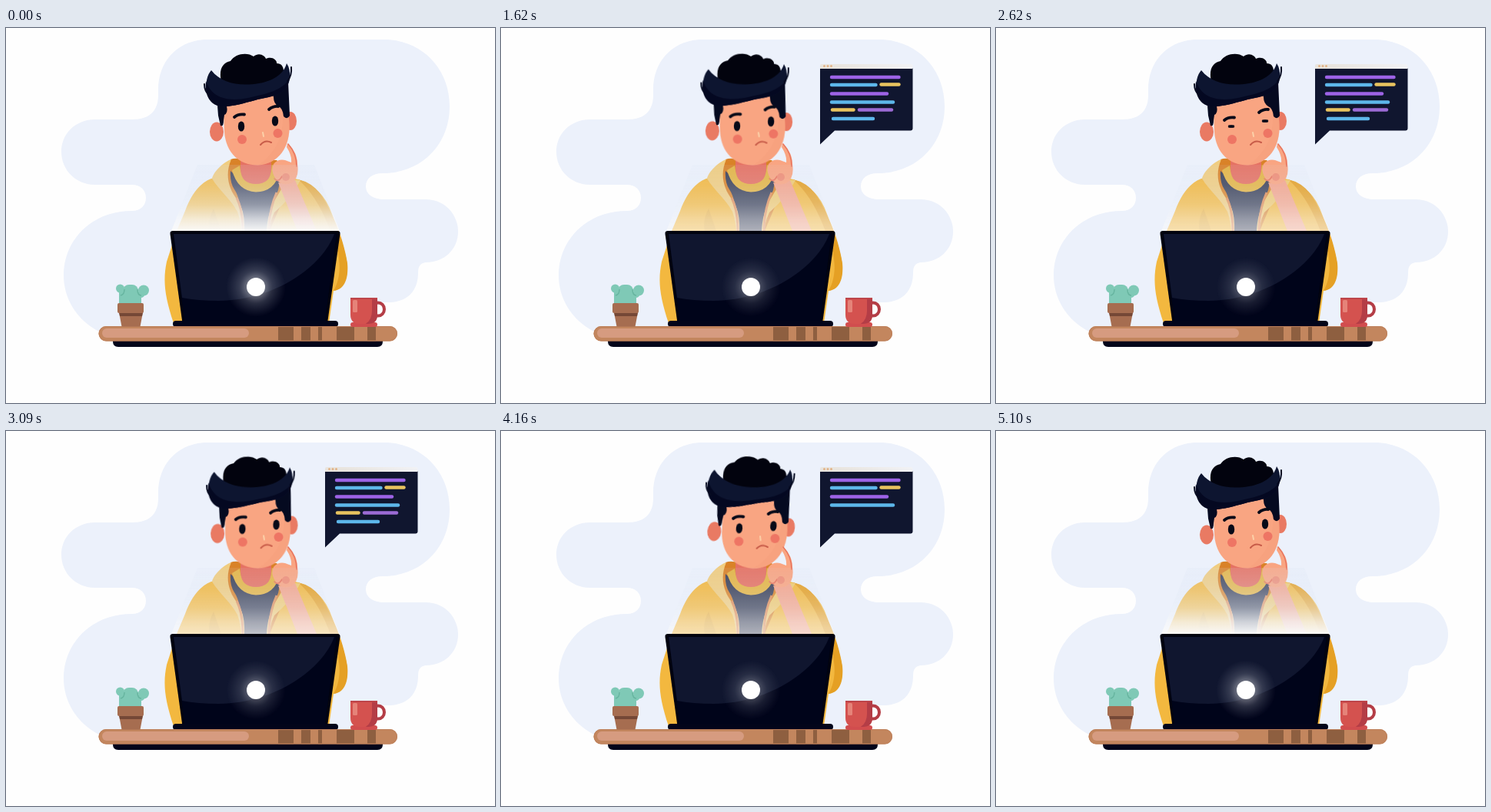
An HTML page for the animation above (5170 ms loop, 636 px wide and 488 px high).

```html
<!DOCTYPE html>
<html lang="en">
<head>
<meta charset="utf-8">
<title>Thinking at the laptop</title>
<style>
  html, body { margin: 0; width: 100%; height: 100%; overflow: hidden; background: #fefefe; }
  svg { display: block; width: 100%; height: 100%; }

  .head, .eye, .brow, .beam, .glow, .bubble, .line { animation: 5170ms linear infinite; }
  .head { animation-name: tilt; animation-timing-function: ease-in-out; transform-origin: 323px 170px; }
  .eye { animation-name: blink; transform-box: fill-box; transform-origin: center; }
  .brow { animation-name: frown; }
  .beam { animation-name: shine; }
  .glow { animation-name: shine; }
  .bubble { animation-name: pop; transform-origin: 415px 151px; }
  .line { fill: none; stroke-width: 4.4; stroke-linecap: round; stroke-dasharray: 1 3; }

  @keyframes tilt {
    0%, 4.4%, 34.8%, 54.2%, 96.3%, 100% { transform: none; }
    15.5%, 25.1%, 67.7%, 81.5% { transform: rotate(5.2deg); }
  }
  @keyframes blink {
    0%, 48.7%, 53.5%, 67.5%, 73%, 100% { transform: none; }
    50.7% { transform: scaleY(.35); }
    51.5%, 69.4%, 70.8% { transform: scaleY(0); }
  }
  @keyframes frown {
    0%, 48.7%, 53.5%, 67.5%, 73%, 100% { transform: none; }
    50.7% { transform: translateY(4px); }
    51.5%, 69.4%, 70.8% { transform: translateY(6.5px); }
  }
  @keyframes shine {
    0%, 4.4%, 68%, 71%, 97%, 100% { opacity: 1; }
    16.4% { opacity: .76; }
    24%, 57%, 80%, 90% { opacity: .62; }
  }
  @keyframes pop {
    0%, 4.4% { transform: scale(0); opacity: 0; }
    4.45% { transform: scale(.5); opacity: 1; }
    7.4% { transform: scale(1.02); }
    8.8%, 60.8% { transform: none; opacity: 1; }
    62.4%, 63.3% { transform: scale(0); opacity: 0; }
    63.4% { transform: scale(.5); opacity: 1; }
    65.6%, 98.6% { transform: none; opacity: 1; }
    98.64%, 100% { transform: none; opacity: 0; }
  }
</style>
</head>
<body>
<svg viewBox="0 0 636 488" preserveAspectRatio="none">
  <defs>
    <linearGradient id="light" gradientUnits="userSpaceOnUse" x1="0" y1="178" x2="0" y2="264">
      <stop offset="0" stop-color="#d5e0f4" stop-opacity=".14"/>
      <stop offset=".3" stop-color="#dfe7f5" stop-opacity=".27"/>
      <stop offset=".6" stop-color="#eaf0f8" stop-opacity=".5"/>
      <stop offset=".82" stop-color="#f5f7fa" stop-opacity=".8"/>
      <stop offset="1" stop-color="#fafafa" stop-opacity=".98"/>
    </linearGradient>
    <radialGradient id="halo">
      <stop offset=".2" stop-color="#fff" stop-opacity=".5"/>
      <stop offset=".55" stop-color="#b9bdc9" stop-opacity=".22"/>
      <stop offset="1" stop-color="#8e94a8" stop-opacity="0"/>
    </radialGradient>
    <linearGradient id="bar">
      <stop offset=".2" stop-color="#e9e5df"/>
      <stop offset="1" stop-color="#f1f2f5"/>
    </linearGradient>
    <clipPath id="board"><rect x="120.500" y="388" width="388.500" height="19.500" rx="9.700"/></clipPath>
    <clipPath id="mug"><path d="M448 351H483V373Q483 385 471 385H460Q448 385 448 373Z"/></clipPath>
  </defs>

  <!-- backdrop -->
  <path fill="#ecf1fb" d="M262 15H492C540 15 577 52 577 102S540 189 490 189C476 189 468 196 468 206S477 223 492 223H546C570 223 588 242 588 265S570 305 546 305Q536 306 536 318C536 343 522 357 496 357H455V395H121C92 380 75 352 75 322C75 276 111 238 164 238C175 238 182 231 182 221S175 204 164 204H116C91 204 72 185 72 161S91 119 116 119H165C187 119 198 107 198 88V80C198 43 224 15 262 15Z"/>

  <!-- jacket and shirt -->
  <path fill="#f3b83f" d="M292 176L270 195C253 200 241 216 233 238L222 264L209 304C204 328 206 348 218 384H420L426 342C438 340 445 328 444 308C440 282 430 258 424 242Q412 207 380 197Z"/>
  <path fill="#e5a024" d="M380 197Q398 201 409 216C420 232 438 268 444 306C446 330 438 341 426 342C440 318 433 286 421 262Q405 219 380 197Z"/>
  <path fill="#dba235" opacity=".5" d="M270 235Q262 250 265 264H280Z"/>
  <path fill="#d98228" d="M292 171Q300 168 310 172L352 172L372 195L343 264H307L302 238Q284 214 287 186Z"/>
  <path fill="#3a4058" d="M292 186Q310 204 326 205Q344 205 358 191L354 211Q344 230 343 264H307Q307 225 297 210Q291 201 292 186Z"/>
  <path fill="#e4b545" d="M294 185L304 179Q306 202 325 202Q344 202 346 178L356 187Q350 213 325 213.500Q301 212 294 185Z"/>
  <path fill="#e57263" d="M305 168H345V184Q344 203 325 203T305 184Z"/>
  <path fill="#f0cd80" d="M293 171C282 175 270 187 268 196C277 211 291 221 301 239Q305 250 306 264H310Q311 239 302 225C288 208 285 189 293 171Z"/>
  <path fill="#efc970" d="M383 198Q372 220 349 240Q343 252 343 264H339Q340 242 349 225L365 198Z"/>
  <path fill="none" stroke="#df8c55" stroke-width="3" d="M300 221Q308 237 308 264M352 214Q342 237 342 264"/>

  <!-- head -->
  <g class="head">
    <ellipse cx="274" cy="135" rx="9" ry="12.500" fill="#e97a63"/>
    <ellipse cx="370" cy="121" rx="8" ry="12" fill="#e97a63"/>
    <path fill="#f9a582" d="M282 95L284 135C286 164 305 179 328 178.500C354 177 370 155 368.500 125L366 82Z"/>
    <path fill="#f39a78" opacity=".35" d="M357 92Q370 148 329 178C354 177 370 155 368.500 125L366 88Z"/>
    <path fill="#050a20" d="M274 88L276 114L279 127Q283 129 283 120L284 113Q289 111 287 101L296 95ZM346 80L348 90Q348 98 354 102Q360 104 361 115Q366 120 369 114L367 70Z"/>
    <path fill="#02030e" d="M280 70C276 52 283 45 292 43C298 33 314 31 322 37C329 31 337 36 338 40C346 36 353 42 352 46C360 46 363 53 360 66Q320 88 280 70Z"/>
    <path fill="#0d1530" d="M267 55C256 67 258 99 279 102C294 103 308 98 324 94C342 89 366 89 369 65Q370 53 365 46C361 61 346 69 329 72C305 76 281 73 267 55Z"/>
    <path fill="#040821" d="M260 69C258 90 267 100 279 102C294 103 308 98 324 94C342 89 366 89 369 65C361 81 338 86 315 91C289 96 268 92 260 69Z"/>
    <path fill="none" stroke="#050a20" stroke-width="2" stroke-linecap="round" d="M258 73Q258 83 265 88M371 51Q372 62 366 69"/>
    <g fill="none" stroke="#070a18" stroke-width="3.800" stroke-linecap="round">
      <path class="brow" d="M297 116Q302 111.500 310 112.500"/>
      <path class="brow" d="M342 106Q347 101.500 354 102"/>
    </g>
    <ellipse class="eye" cx="306" cy="128" rx="4.200" ry="6.600" fill="#070a18"/>
    <ellipse class="eye" cx="350" cy="121" rx="4.200" ry="6.600" fill="#070a18"/>
    <circle cx="307" cy="145" r="6" fill="#ee7564"/>
    <circle cx="353.500" cy="137" r="6" fill="#ee7564"/>
    <path fill="none" stroke="#fbd0a8" stroke-width="2" stroke-linecap="round" d="M334 136L335 141"/>
    <path fill="none" stroke="#c75b48" stroke-width="2" stroke-linecap="round" d="M331 152Q337 145 345 149"/>
  </g>

  <!-- hand -->
  <path fill="#f4a58c" d="M354 201Q367 204 376 198L404 264H379Z"/>
  <path fill="#f9a582" d="M366 150C371 155 379 163 379 177Q382 195 371 202Q358 207 350 195Q344 185 348 177Q354 170 363 172L371 175Q372 166 365 155Z"/>
  <path fill="none" stroke="#e8765f" stroke-width="1.600" stroke-linecap="round" d="M367 151Q378 163 378 180M349 196Q354 202 359 193"/>
  <circle cx="364" cy="194" r="5" fill="#ef8d75"/>

  <path class="beam" fill="url(#light)" d="M249 178H401L434 264H215Z"/>

  <!-- laptop -->
  <path fill="#01030f" d="M217 264H431Q435 264 434.500 268L418 384H229.500L213.500 268Q213 264 217 264Z"/>
  <path fill="#00041a" d="M218 268H430L415 381H232Z"/>
  <path fill="#10162f" d="M218 268H427C412 309 352 354 277 355Q249 355 229 351Z"/>
  <rect x="217" y="381" width="215" height="8" rx="4" fill="#02051a"/>
  <circle class="glow" cx="325" cy="337" r="39" fill="url(#halo)"/>
  <circle cx="325" cy="337" r="12" fill="#fff"/>

  <!-- desk -->
  <path fill="#02051a" d="M139 405H490V408Q490 415 483 415H146Q139 415 139 408Z"/>
  <g clip-path="url(#board)">
    <path fill="#c3865e" d="M120 388H509V408H120Z"/>
    <path fill="#8e5f40" d="M354 388h20v20h-20zM384 388h12v20h-12zM406 388h5v20h-5zM430 388h23v20h-23zM470 388h11v20h-11z"/>
  </g>
  <rect x="121" y="388.500" width="387.500" height="18.500" rx="9.200" fill="none" stroke="#bd7f59"/>
  <rect x="125" y="391" width="191" height="12" rx="6" fill="#d69b80"/>

  <!-- cactus -->
  <g fill="#7fc9b6">
    <rect x="152" y="334" width="20" height="30" rx="8"/>
    <circle cx="148.500" cy="339" r="5.500"/>
    <circle cx="179" cy="341.500" r="7"/>
    <path d="M147 342H156V360H147ZM167 343H182Q180 351 176 351V360H167Z"/>
  </g>
  <path fill="none" stroke="#66b49f" stroke-width="1.400" d="M154 340Q154 347 149 348M171 340Q171 348 176 348"/>
  <path fill="#a66d50" d="M147 370H178L174.500 388.500H150.500Z"/>
  <path fill="#754836" d="M147 370H178L177 375H148Z"/>
  <rect x="145" y="358" width="34" height="13" rx="2" fill="#a66d50"/>

  <!-- cup -->
  <ellipse cx="484" cy="366" rx="8" ry="8.500" fill="none" stroke="#b43d46" stroke-width="4"/>
  <rect x="448" y="383" width="35" height="6" rx="3" fill="#d14d4e"/>
  <g clip-path="url(#mug)">
    <path fill="#d4524f" d="M448 351H483V386H448Z"/>
    <path fill="#b43d46" d="M476 351H484V386H466Q476 381 476 368Z"/>
    <path fill="#bd454a" d="M448 351H483V353H448Z"/>
  </g>
  <rect x="451" y="354" width="6" height="16" rx="1.500" fill="#e58379"/>

  <!-- speech window -->
  <g class="bubble">
    <path fill="#10162f" d="M415 52H535.500V130.500Q535.500 133.500 532.500 133.500H434L415 151.500Z"/>
    <path fill="url(#bar)" d="M415 53V49Q415 47 417 47H533.500Q535.500 47 535.500 49V53Z"/>
    <g fill="#e2b489"><circle cx="420.500" cy="49.500" r="1.500"/><circle cx="425" cy="49.500" r="1.500"/><circle cx="429.500" cy="49.500" r="1.500"/></g>
    <g id="code"></g>
  </g>
</svg>
<script>
  const LOOP = 5170;
  const PURPLE = '#9d63e6', BLUE = '#5db7ea', YELLOW = '#e8c35f';
  const STARTS = [320, 3640];   // typing begins, once per window
  const CLEARED = 3230;         // window is closed here

  // x1, x2, y, colour, typing delay, typing time
  const lines = [
    [430, 517.5, 64, PURPLE, 0, 125],
    [430, 487.5, 74, BLUE, 125, 85],
    [494.5, 517.5, 73.5, YELLOW, 210, 40],
    [430, 502, 85.5, PURPLE, 250, 125],
    [430, 510, 96.5, BLUE, 375, 125],
    [431, 458.5, 106.5, YELLOW, 560, 55],
    [466, 508, 106.5, '#9b6bd5', 615, 75],
    [432, 484, 118, BLUE, 690, 110]
  ];

  const key = (ms, drawn, opacity) =>
    `${(ms / LOOP * 100).toFixed(3)}% { stroke-dashoffset: ${drawn ? 0 : 1}; opacity: ${opacity} }`;
  const hidden = ms => key(ms, false, 0);
  const empty = ms => key(ms, false, 1);
  const full = ms => key(ms, true, 1);

  let rules = '', marks = '';
  lines.forEach(([x1, x2, y, colour, delay, time], i) => {
    const [a, b] = STARTS.map(start => start + delay);
    rules += `@keyframes type${i} {
      ${hidden(0)} ${hidden(a - 1)} ${empty(a)} ${full(a + time)}
      ${full(CLEARED)} ${hidden(CLEARED + 1)}
      ${hidden(b - 1)} ${empty(b)} ${full(b + time)} ${full(LOOP)} }\n`;
    marks += `<path class="line" pathLength="1" d="M${x1} ${y}H${x2}" stroke="${colour}" style="animation-name:type${i}"/>`;
  });
  const sheet = document.createElement('style');
  sheet.textContent = rules;
  document.head.append(sheet);
  document.getElementById('code').innerHTML = marks;
</script>
</body>
</html>
```
